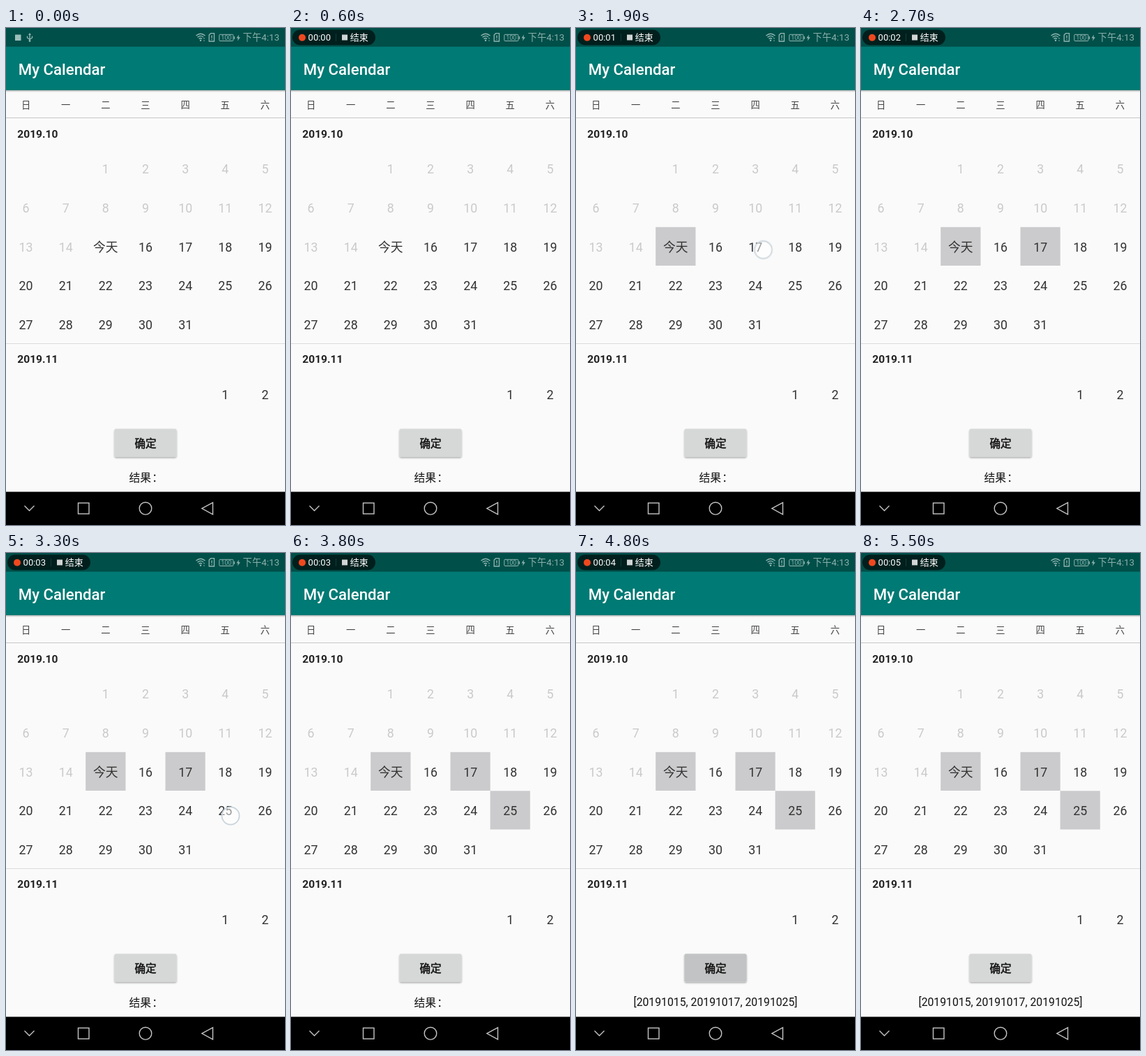
Animation of 400x711 px, one loop 6000 ms. Source, as an HTML page:

```html
<!DOCTYPE html>
<html lang="zh-CN">
<head>
<meta charset="utf-8">
<title>My Calendar</title>
<style>
  html, body { margin: 0; width: 100%; height: 100%; overflow: hidden; background: #fafafa; }
  svg { display: block; }
  text { font-family: Roboto, "Noto Sans CJK SC", "Noto Sans CJK", sans-serif; fill: #333; }
  .mid { text-anchor: middle; }
  .title { font-size: 22.2px; font-weight: 500; fill: #fff; }
  .week { font-size: 13.33px; fill: #444; }
  .month { font-size: 15.56px; font-weight: 700; fill: #222; }
  .day { font-size: 17.78px; }
  .past { fill: #cacaca; }
  .label { font-size: 15.78px; fill: #111; }
  .ok { font-size: 15.56px; fill: #111; stroke: #111; stroke-width: .5; }
  .rec { font-size: 13px; fill: #fff; }
  .time { font-size: 13.33px; fill: #8ab0ac; }
  .line { fill: none; stroke: #93b6b2; stroke-width: 1.3; }
  .nav { fill: none; stroke: #c4c4c4; stroke-width: 1.4; }
  .cell { fill: #cbcbcd; }

  .anim { animation: 6s step-end infinite; }
  #usb { animation-name: usb; }
  #pill { animation-name: pill; }
  #secs { animation-name: secs; }
  #pick1 { animation-name: pick1; }
  #pick2 { animation-name: pick2; }
  #pick3 { animation-name: pick3; }
  #touch { animation-name: touch; }
  #empty { animation-name: empty; }
  #answer { animation-name: answer; }
  #press { animation-name: press; animation-timing-function: linear; }

  @keyframes usb { 0% { opacity: 1 } 1.66%, 100% { opacity: 0 } }
  @keyframes pill { 0% { opacity: 0 } 1.66%, 100% { opacity: 1 } }
  @keyframes secs {
    0% { transform: translateY(0) }
    19.99% { transform: translateY(-30px) }
    36.66% { transform: translateY(-60px) }
    53.33% { transform: translateY(-90px) }
    69.99% { transform: translateY(-120px) }
    86.66%, 100% { transform: translateY(-150px) }
  }
  @keyframes pick1 { 0% { opacity: 0 } 16.66%, 100% { opacity: 1 } }
  @keyframes pick2 { 0% { opacity: 0 } 33.33%, 100% { opacity: 1 } }
  @keyframes pick3 { 0% { opacity: 0 } 56.66%, 100% { opacity: 1 } }
  @keyframes touch {
    0% { opacity: 0; transform: translate(147px, 318px) }
    13.33% { opacity: 1; transform: translate(147px, 318px) }
    18.33% { opacity: 0; transform: translate(147px, 318px) }
    31.66% { opacity: 1; transform: translate(268.5px, 317.3px) }
    34.99% { opacity: 0; transform: translate(268.5px, 317.3px) }
    53.33% { opacity: 1; transform: translate(322px, 376px) }
    58.33% { opacity: 0; transform: translate(322px, 376px) }
    76.66% { opacity: 1; transform: translate(225px, 597px) }
    79.99%, 100% { opacity: 0; transform: translate(225px, 597px) }
  }
  @keyframes empty { 0% { opacity: 1 } 79.99%, 100% { opacity: 0 } }
  @keyframes answer { 0% { opacity: 0 } 79.99%, 100% { opacity: 1 } }
  @keyframes press {
    0%, 76.66% { opacity: 0 }
    78.33%, 80.5% { opacity: 1 }
    86.66%, 100% { opacity: 0 }
  }
</style>
</head>
<body>
<svg width="400" height="711" viewBox="0 0 400 711">
  <defs>
    <linearGradient id="shade" x2="0" y2="1">
      <stop offset="0" stop-color="#000" stop-opacity=".28"/>
      <stop offset="1" stop-color="#000" stop-opacity="0"/>
    </linearGradient>
    <filter id="drop" x="-10%" y="-20%" width="120%" height="150%">
      <feDropShadow dx="0" dy="1.4" stdDeviation="1.2" flood-opacity=".38"/>
    </filter>
  </defs>
  <rect width="400" height="711" fill="#fafafa"/>

  <!-- status and app bars -->
  <rect width="400" height="89" fill="#007a74"/>
  <rect width="400" height="26.700" fill="#004f49"/>
  <rect y="89" width="400" height="3" fill="url(#shade)"/>
  <text class="title" x="17.800" y="66.700">My Calendar</text>

  <g id="usb" class="anim">
    <rect x="13" y="9.500" width="8.500" height="8.500" fill="#9dbdb9"/>
    <path class="line" d="M34 9V19M30.500 11.500V14L34 16.500L37.500 14V11.500"/>
    <path d="M34 7l2 3h-4z" fill="#93b6b2"/>
    <circle cx="34" cy="18.500" r="1.400" fill="#93b6b2"/>
  </g>

  <g id="pill" class="anim">
    <rect x="2" y="2.500" width="119" height="22" rx="11" fill="#001f1d"/>
    <circle cx="16" cy="13.700" r="5" fill="#f1481f"/>
    <text class="rec" x="24.600" y="18.400">00:0</text>
    <svg x="49" y="4" width="10" height="20">
      <g id="secs" class="anim"></g>
    </svg>
    <path d="M64.500 8V19" stroke="#123c39"/>
    <rect x="73" y="9.500" width="8" height="8" fill="#d0d4d4"/>
    <text class="rec" x="84.700" y="18.400">结束</text>
  </g>

  <g class="line">
    <path d="M272.500 11Q279 5.500 285.500 11M274.500 13.300Q279 9.500 283 13M276.500 15.600Q279 13.500 281 15.500"/>
    <circle cx="279" cy="17.700" r=".6"/>
    <path d="M284 14v1.500M284 17.500v1.200"/>
    <path d="M293.500 7.700H298.500V19H291.200V10Z"/>
    <path d="M295 10.500V14.500M295 15.700V17"/>
    <rect x="305.800" y="9.300" width="20" height="9.200" rx="1" stroke-width="1"/>
    <path d="M327.300 12v4"/>
  </g>
  <text class="time mid" x="315.800" y="17.300" style="font-size:9px">100</text>
  <path d="M334 9.500L330.500 14.500H332.800L332 18.500L335.800 13.200H333.400Z" fill="#93b6b2"/>
  <text class="time" x="339.600" y="18.400">下午4:13</text>

  <!-- calendar -->
  <rect y="128" width="400" height="1" fill="#c8c8c8"/>
  <rect y="451" width="400" height="1" fill="#dcdcdc"/>
  <text class="month" x="16.300" y="157.300">2019.10</text>
  <text class="month" x="16.300" y="479.400">2019.11</text>
  <rect id="pick1" class="cell anim" x="114.200" y="284.800" width="57.300" height="55.200"/>
  <rect id="pick2" class="cell anim" x="228.500" y="284.800" width="57.200" height="55.200"/>
  <rect id="pick3" class="cell anim" x="285.600" y="340.300" width="57.200" height="55.200"/>
  <g id="days"></g>

  <!-- button and result -->
  <rect x="155.500" y="573.500" width="89" height="40" rx="2" fill="#d6d7d7" filter="url(#drop)"/>
  <rect id="press" class="anim" x="155.500" y="573.500" width="89" height="40" rx="2" fill="#c2c3c4"/>
  <text class="ok mid" x="200" y="600">确定</text>
  <text id="empty" class="label anim" x="176.400" y="648.800">结果<tspan dx="1.300">：</tspan></text>
  <text id="answer" class="label mid anim" x="200" y="648.300">[20191015, 20191017, 20191025]</text>

  <!-- navigation bar -->
  <rect y="663.500" width="400" height="48" fill="#000"/>
  <g class="nav">
    <path d="M26.500 683.500L33.500 690.500L40.500 683.500"/>
    <rect x="103.500" y="679.500" width="15.500" height="15.500"/>
    <circle cx="200" cy="687.300" r="8.800"/>
    <path d="M280.800 687.300L296.500 678.800V695.800Z"/>
  </g>

  <g id="touch" class="anim">
    <circle r="12.500" fill="#fff" fill-opacity=".5" stroke="#cbd5dc" stroke-width="1.800"/>
  </g>
</svg>
<script>
  const NS = 'http://www.w3.org/2000/svg';
  const days = document.getElementById('days');
  const secs = document.getElementById('secs');

  function label(parent, str, x, y, cls) {
    const el = document.createElementNS(NS, 'text');
    el.setAttribute('x', x);
    el.setAttribute('y', y);
    el.setAttribute('class', cls);
    el.textContent = str;
    parent.append(el);
  }

  const colX = col => (col + 0.5) * 400 / 7;

  [...'日一二三四五六'].forEach((ch, i) => label(days, ch, colX(i), 114.8, 'week mid'));

  for (let d = 1; d <= 31; d++) {
    const slot = d + 1;
    const y = 208.45 + Math.floor(slot / 7) * 55.55;
    label(days, d === 15 ? '今天' : d, colX(slot % 7), y, 'day mid' + (d < 15 ? ' past' : ''));
  }
  [1, 2].forEach(d => label(days, d, colX(d + 4), 530.8, 'day mid'));

  for (let s = 0; s < 6; s++) label(secs, s, 0.7, 14.4 + s * 30, 'rec');
</script>
</body>
</html>
```
